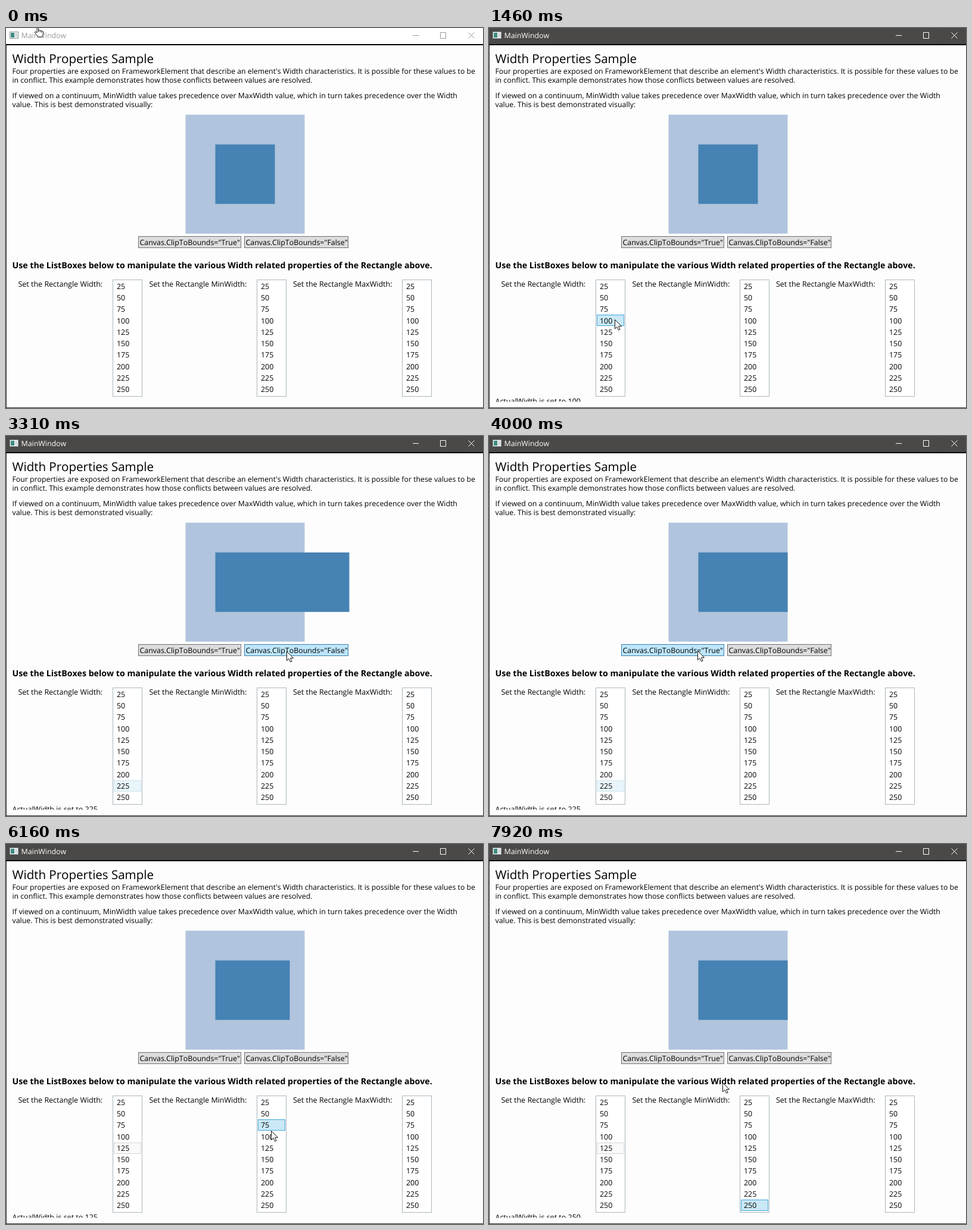
Recreate the animation shown at these times as an HTML page. Size 801x639 px, loop 8 s.

```html
<!DOCTYPE html>
<html lang="en">
<head>
<meta charset="utf-8">
<title>Width Properties Sample</title>
<style>
  html, body { margin: 0; width: 100%; height: 100%; overflow: hidden; background: #fdfdfd; }
  svg { display: block; width: 801px; height: 639px; }
  text {
    font: 12.4px "Open Sans", "Noto Sans", sans-serif;
    font-kerning: none; font-variant-ligatures: none;
    text-rendering: geometricPrecision; white-space: pre;
  }
</style>
</head>
<body>
<svg id="stage" viewBox="0 0 801 639" xmlns="http://www.w3.org/2000/svg"></svg>
<script>
const LOOP = 8000;
const stage = document.getElementById('stage');

function add(tag, attrs, parent = stage) {
  const el = document.createElementNS(stage.namespaceURI, tag);
  set(el, attrs);
  parent.append(el);
  return el;
}
function set(el, attrs) {
  for (const key in attrs) el.setAttribute(key, attrs[key]);
}
function rect(x, y, width, height, fill, stroke = 'none') {
  return add('rect', { x, y, width, height, fill, stroke });
}
function label(x, y, str, size = 12.4, weight = 400) {
  const el = add('text', { x, y, fill: '#000' });
  el.style.fontSize = size + 'px';
  el.style.fontWeight = weight;
  el.textContent = str;
  return el;
}

// Window frame
rect(0, 0, 801, 639, '#fdfdfd');
const titleBar = rect(0, 0, 801, 28, '#fff');
rect(0, 27, 801, 2, '#000');
rect(0, 29, 1, 610, '#333');
rect(0, 638, 801, 1, '#333');
rect(6.5, 6.5, 14, 11, '#f4f6f6', '#8d9496');
rect(8, 8, 6, 8, '#3c8a80');
rect(15, 8, 4, 8, '#d3d9dc');
const caption = label(25.5, 17, 'MainWindow');
const controls = add('path', {
  d: 'M683 12.5h10M729.5 7.5h9v10h-9zM776.5 7.5l10 10m0-10l-10 10', fill: 'none'
});

// Page text
label(10.5, 59, 'Width Properties Sample', 20.5);
label(10.5, 77, "Four properties are exposed on FrameworkElement that describe an element's Width characteristics. It is possible for these values to be", 12.3);
label(10.5, 92, 'in conflict. This example demonstrates how those conflicts between values are resolved.', 12.3);
label(10.5, 117.5, 'If viewed on a continuum, MinWidth value takes precedence over MaxWidth value, which in turn takes precedence over the Width', 12.42);
label(10.5, 132.5, 'value. This is best demonstrated visually:', 12.42);
label(10.5, 404, 'Use the ListBoxes below to manipulate the various Width related properties of the Rectangle above.', 14.15, 700);

// Canvas with the sized rectangle
rect(301.5, 145.8, 200, 200, '#b0c4de');
const box = rect(351.5, 195.8, 100, 100, '#4682b4');

function makeButton(x, width, value) {
  const face = rect(x, 350.5, width, 19, '#ddd', '#707070');
  label(x + 2, 365, `Canvas.ClipToBounds="${value}"`);
  return { x, width, face };
}
const buttons = [makeButton(222.5, 172, 'True'), makeButton(400.5, 174, 'False')];

// List boxes
const ROW = 19.28;
const rowTop = i => Math.round(424.4 + i * ROW) + 0.5;
function makeList(x, labelX, name) {
  label(labelX, 435, `Set the Rectangle ${name}:`, 12.5);
  rect(x, 423.5, 49, 196, '#fff', '#a9b6be');
  const rows = [];
  for (let i = 0; i < 10; i++) {
    rows.push(rect(x + 2, rowTop(i), 45, 18, 'none'));
    label(x + 6.5, 438.7 + i * ROW, (i + 1) * 25);
  }
  return { x, rows };
}
const lists = [
  makeList(179.5, 20.5, 'Width'),
  makeList(421.5, 240.5, 'MinWidth'),
  makeList(665.5, 482, 'MaxWidth')
];

const clip = add('clipPath', { id: 'pageEnd' });
add('rect', { x: 0, y: 600, width: 801, height: 28.5 }, clip);
const actual = label(10.5, 631.5, '', 12.5);
actual.setAttribute('clip-path', 'url(#pageEnd)');

// Pointers
const arrow = add('path', {
  d: 'M.5.5V15.8L4 12.5L6.5 18L9 17L6.6 11.6H11.5Z',
  fill: '#fff', stroke: '#111', 'stroke-linejoin': 'round'
});
const hand = add('path', {
  d: 'M5 11V1.5Q6.3-.5 7.5 1.5V7Q9 5.5 10.3 7.5Q12 6.3 13 8.3Q15 7.5 15.5 9.5V13L13.5 18H7L2 11.5Q.5 9 2.3 9ZM7.5 7V10M10.3 7.5V10M13 8.3V11',
  fill: '#fff', stroke: '#111', 'stroke-linejoin': 'round', transform: 'translate(47 -3)'
});

// Screen refreshes: first, last, count
const ticks = [0];
for (const [from, to, n] of [
  [80, 860, 9], [950, 1750, 9], [1840, 2240, 5], [2620, 3400, 9], [3510, 4290, 9], [4380, 4690, 4],
  [4890, 5070, 3], [5270, 5270, 1], [5470, 6250, 9], [6360, 7030, 8], [7520, 7920, 5]
]) for (let i = 0; i < n; i++) ticks.push(from + (to - from) * i / Math.max(1, n - 1));

// Pointer path: time, x, y
const path = [
  [0, 52, -2], [300, 100, 150], [860, 203, 425], [1050, 212, 450], [1250, 212, 450],
  [1450, 211, 490], [1640, 212, 525], [1840, 213, 545], [1950, 213, 545], [2240, 214, 584],
  [2620, 222, 577], [3200, 460, 366], [3302, 471, 362], [3500, 468, 362], [3900, 352, 361],
  [4190, 346, 361], [4690, 214, 525], [4890, 207, 542], [5070, 207, 535], [5270, 207, 512],
  [5470, 208, 511], [5950, 436, 474], [6152, 445, 482], [6250, 446, 486], [6550, 446, 530],
  [6840, 445, 590], [7030, 444, 607], [7520, 442, 600], [7920, 392, 401]
];

// Clicks: time and what they change
const clicks = [
  [0, { active: false, clipped: false, focus: -1, width: 0, min: 0 }],
  [1250, { active: true, focus: 0, width: 50 }],
  [1450, { width: 100 }],
  [1640, { width: 150 }],
  [1840, { width: 175 }],
  [2240, { width: 225 }],
  [3300, { focus: -1 }],
  [3990, { clipped: true }],
  [4880, { focus: 0, width: 175 }],
  [5470, { width: 125 }],
  [6050, { focus: 1, min: 75 }],
  [6550, { min: 150 }],
  [6840, { min: 225 }],
  [7025, { min: 250 }]
];

function pointerAt(t) {
  const k = path.findIndex(p => p[0] > t);
  if (k < 0) return path[path.length - 1].slice(1);
  const a = path[k - 1], b = path[k], f = (t - a[0]) / (b[0] - a[0]);
  return [1, 2].map(i => Math.round(a[i] + (b[i] - a[i]) * f));
}

function rowLook(selected, hovered, focused, isButtonFocus) {
  if (selected && focused) return ['#cae8f6', '#3ea9dc'];
  if (selected && isButtonFocus) return ['#e9f5fa', '#cbe5ee'];
  if (selected) return ['#fafafa', '#d6d6d6'];
  if (hovered) return ['#e5f4fb', '#80c6e9'];
  return ['none', 'none'];
}

function draw(now) {
  const t = ticks.filter(v => v <= now % LOOP).pop();
  const state = Object.assign({}, ...clicks.filter(c => c[0] <= t).map(c => c[1]));
  const [px, py] = pointerAt(t);
  const ink = state.active ? '#fff' : '#999';

  set(titleBar, { fill: state.active ? '#4b4947' : '#fff' });
  set(caption, { fill: ink });
  set(controls, { stroke: ink });

  const size = Math.max(state.width || 100, state.min);
  set(box, { width: state.clipped ? Math.min(size, 150) : size });
  actual.textContent = state.active ? `ActualWidth is set to ${size}` : '';

  for (const b of buttons) {
    const over = px >= b.x && px <= b.x + b.width && py >= 350 && py <= 370;
    set(b.face, { fill: over ? '#bee6fd' : '#ddd', stroke: over ? '#3c7fb1' : '#707070' });
  }
  const chosen = [state.width, state.min, 0];
  lists.forEach((list, n) => list.rows.forEach((row, i) => {
    const top = rowTop(i);
    const over = px >= list.x + 2 && px <= list.x + 47 && py >= top && py < top + 19;
    const selected = chosen[n] === (i + 1) * 25;
    const [fill, stroke] = rowLook(selected, over, state.focus === n, state.focus < 0);
    set(row, { fill, stroke });
  }));

  set(arrow, { transform: `translate(${px} ${py})`, visibility: t < 80 ? 'hidden' : 'visible' });
  set(hand, { visibility: t < 80 ? 'visible' : 'hidden' });
}

const start = performance.now();
function loop() {
  draw(performance.now() - start);
  requestAnimationFrame(loop);
}
loop();
</script>
</body>
</html>
```
